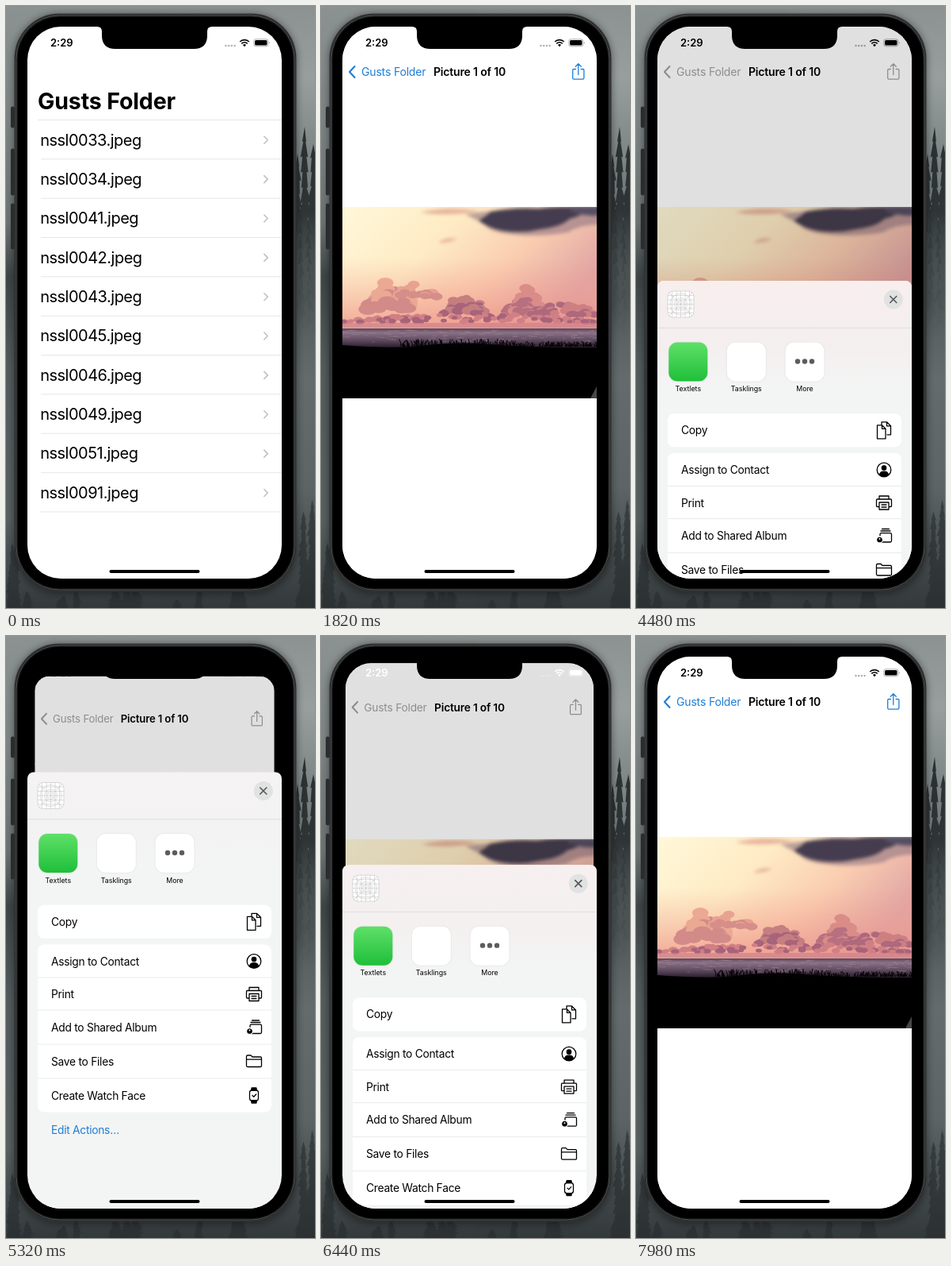
An HTML page for the animation above (8 s loop, 390 by 758 pixels).

```html
<!DOCTYPE html>
<html lang="en">
<head>
<meta charset="utf-8">
<title>Picture list</title>
<style>
  html, body { margin: 0; width: 100%; height: 100%; overflow: hidden; background: #4a5254; }
  svg { display: block; width: 390px; height: 758px; }
  text { font-family: Inter, "Liberation Sans", sans-serif; }
  .large { font-size: 28.5px; font-weight: 700; letter-spacing: -.005em; }
  .row { font-size: 20px; letter-spacing: -.025em; }
  .bar { font-size: 14px; letter-spacing: -.012em; }
  .bold { font-weight: 600; }
  .item { font-size: 13.8px; letter-spacing: -.02em; }
  .label { font-size: 8.8px; text-anchor: middle; }
  .line { fill: none; stroke: currentColor; stroke-linecap: round; stroke-linejoin: round; }
</style>
</head>
<body>
<svg viewBox="0 0 390 758">
  <defs>
    <linearGradient id="mistL" x2="0" y2="1">
      <stop offset="0" stop-color="#8b9291"/><stop offset=".18" stop-color="#7e8685"/>
      <stop offset=".36" stop-color="#6b7373"/><stop offset=".45" stop-color="#3f4647"/>
      <stop offset=".6" stop-color="#545c5d"/><stop offset=".85" stop-color="#596162"/>
      <stop offset="1" stop-color="#33393b"/>
    </linearGradient>
    <linearGradient id="mistR" x2="0" y2="1">
      <stop offset="0" stop-color="#8b9291"/><stop offset=".12" stop-color="#979e9d"/>
      <stop offset=".3" stop-color="#737b7b"/><stop offset=".48" stop-color="#515959"/>
      <stop offset=".62" stop-color="#636b6c"/><stop offset=".8" stop-color="#5c6465"/>
      <stop offset="1" stop-color="#33393b"/>
    </linearGradient>
    <linearGradient id="pine" gradientUnits="userSpaceOnUse" x1="0" x2="0" y1="150" y2="420">
      <stop offset="0" stop-color="#2a2f30"/><stop offset=".4" stop-color="#2f3536"/>
      <stop offset="1" stop-color="#495152" stop-opacity="0"/>
    </linearGradient>
    <linearGradient id="sky" x2="1" y2=".5">
      <stop offset="0" stop-color="#fff8da"/><stop offset=".4" stop-color="#feebc4"/>
      <stop offset=".7" stop-color="#facdb0"/><stop offset="1" stop-color="#e0a4a4"/>
    </linearGradient>
    <linearGradient id="haze" x2="0" y2="1">
      <stop offset=".4" stop-color="#f4a592" stop-opacity="0"/>
      <stop offset="1" stop-color="#ec8f86" stop-opacity=".8"/>
    </linearGradient>
    <linearGradient id="sea" x2="0" y2="1">
      <stop offset="0" stop-color="#57435a"/><stop offset=".2" stop-color="#8b7286"/>
      <stop offset=".6" stop-color="#5b475c"/><stop offset="1" stop-color="#1c141f"/>
    </linearGradient>
    <linearGradient id="tint" x2="0" y2="1">
      <stop offset="0" stop-color="#f8eeee"/><stop offset=".5" stop-color="#f4efef"/>
      <stop offset="1" stop-color="#f2f5f4" stop-opacity="0"/>
    </linearGradient>
    <linearGradient id="green" x2="0" y2="1">
      <stop offset="0" stop-color="#5fe068"/><stop offset="1" stop-color="#1fbf3a"/>
    </linearGradient>
    <filter id="soft"><feGaussianBlur stdDeviation=".7"/></filter>
    <filter id="smoke"><feGaussianBlur stdDeviation="2.2"/></filter>
    <filter id="shade" x="-20%" y="-20%" width="140%" height="140%"><feGaussianBlur stdDeviation="4"/></filter>
    <clipPath id="screen"><rect x="27" y="26" width="321" height="695" rx="42"/></clipPath>
    <clipPath id="cardClip"><rect id="cardRect" x="27" y="26" width="321" height="760"/></clipPath>
    <clipPath id="photoClip"><rect x="27" y="253" width="321" height="241"/></clipPath>
  </defs>

  <rect width="195" height="758" fill="url(#mistL)"/>
  <rect x="195" width="195" height="758" fill="url(#mistR)"/>
  <g id="pines" fill="url(#pine)"/>
  <g id="woods" fill="#272c2e" opacity=".6" filter="url(#soft)"/>

  <rect x="9" y="9" width="359" height="732" rx="58" opacity=".35" filter="url(#shade)"/>
  <path d="M8.5 129v22M8.5 182v54M8.5 251v53" stroke="#2a2c2d" stroke-width="5" stroke-linecap="round"/>
  <path d="M366.5 198v86" stroke="#2a2c2d" stroke-width="3"/>
  <rect x="11.5" y="10.5" width="354" height="726" rx="56" fill="#111" stroke="#303233" stroke-width="2"/>
  <rect x="13" y="12" width="351" height="723" rx="54.5" fill="none" stroke="#5b5d5e" stroke-width=".9"/>
  <rect x="15" y="14" width="347" height="719" rx="53"/>

  <g clip-path="url(#screen)">
    <g id="card"><g clip-path="url(#cardClip)">
      <rect x="27" y="26" width="321" height="760" fill="#fff"/>
      <g id="list"></g>
      <g id="detail">
        <rect x="27" y="26" width="321" height="760" fill="#fff"/>
        <g clip-path="url(#photoClip)">
          <rect x="27" y="253" width="321" height="160" fill="url(#sky)"/>
          <rect x="27" y="253" width="321" height="160" fill="url(#haze)"/>
          <g id="storm" filter="url(#smoke)"></g>
          <g id="clouds" filter="url(#soft)"></g>
          <rect x="27" y="406" width="321" height="26" fill="url(#sea)"/>
          <path id="waves" stroke="#b0909c" stroke-width=".6" opacity=".6"/>
          <path d="M27 427Q80 431 115 429Q170 422 215 426T348 430V494H27Z"/>
          <path id="grass" fill="none" stroke="#060406" stroke-width="1"/>
          <path d="M348 479v15h-8z" fill="#4a4648"/>
        </g>
      </g>
      <text id="large" class="large">Gusts Folder</text>
      <g id="nav">
        <g id="back">
          <path class="line" d="M42.500 76l-6.500 7 6.500 7" stroke-width="2.100"/>
          <text class="bar" x="51" y="88" fill="currentColor">Gusts Folder</text>
        </g>
        <text id="title" class="bar bold" y="88">Picture 1 of 10</text>
        <path id="share" class="line" stroke-width="1.3" d="M321.500 79.500h-2.500q-1.300 0-1.300 1.300v10q0 1.300 1.300 1.300h11.600q1.300 0 1.300-1.300v-10q0-1.300-1.300-1.300h-2.500M324.800 86.500v-13.500M321.300 76.300l3.500-3.500 3.500 3.500"/>
      </g>
      <rect id="dim" x="27" y="26" width="321" height="760"/>
    </g></g>

    <g id="status" fill="currentColor">
      <text x="56" y="51" font-size="13" class="bold">2:29</text>
      <g opacity=".3">
        <circle cx="277.500" cy="50" r="1.300"/><circle cx="281.200" cy="50" r="1.300"/>
        <circle cx="284.900" cy="50" r="1.300"/><circle cx="288.600" cy="50" r="1.300"/>
      </g>
      <path d="M295.200 45a8.400 8.400 0 0 1 11.600 0M297.300 47.300a5.400 5.400 0 0 1 7.400 0" fill="none" stroke="currentColor" stroke-width="1.700"/>
      <path d="M299 49a2.800 2.800 0 0 1 4 0L301 51.200z"/>
      <rect x="312.800" y="41.800" width="18" height="9" rx="2.600" fill="none" stroke="currentColor" stroke-width=".8" opacity=".4"/>
      <rect x="314.100" y="43.100" width="15.400" height="6.400" rx="1.500"/>
      <path d="M332 44.800q1.500 1.500 0 3z" opacity=".5"/>
    </g>

    <g id="sheet"></g>
    <rect x="130.500" y="710" width="114" height="4" rx="2"/>
  </g>
  <path d="M115 25H260V26Q254 26 254 32V37Q254 54 237 54H138Q121 54 121 37V32Q121 26 115 26Z"/>
</svg>
<script>
const $ = id => document.getElementById(id);
const range = n => [...Array(n).keys()];
let seed = 11;
const rnd = () => (seed = seed * 16807 % 2147483647) / 2147483647;
const mix = (a, b, k) => a + (b - a) * k;
const clamp = v => Math.max(0, Math.min(1, v));

// Scenery
function tree(x, top, h, w) {
  const side = s => range(14).map(i => {
    const y = top + h * (i + 1) / 14, r = w / 2 * Math.sqrt((i + 1) / 14) * (.6 + rnd() * .7);
    return [[x + s * r, y], [x + s * r * .55, y - 1]];
  }).flat();
  return `<polygon points="${[[x, top], ...side(1), ...side(-1).reverse()].join(" ")}"/>`;
}
$("pines").innerHTML = tree(377, 152, 270, 24) + tree(388, 174, 250, 24) + tree(368, 186, 240, 20);
$("woods").innerHTML =
  range(7).map(() => tree(366 + rnd() * 26, 620 + rnd() * 90, 160, 20)).join("") +
  range(5).map(() => tree(rnd() * 14, 670 + rnd() * 50, 110, 16)).join("") +
  range(18).map(() => tree(rnd() * 390, 725 + rnd() * 24, 60, 16 + rnd() * 20)).join("");

// A heap of small blobs on a flat base, lit from above
function puff(x, y, w, h, light, dark, n) {
  return range(n).map(i => {
    const u = rnd() * 2 - 1, r = 1.5 + h * (.06 + rnd() * .1);
    const top = h * (1 - u * u) * (1 - i / n);
    return `<ellipse cx="${x + u * w / 2}" cy="${y - top * (.7 + rnd() * .3)}" rx="${r * 1.6}" ry="${r}" fill="${rnd() < 1.1 - i / n ? light : dark}"/>`;
  }).join("");
}
$("storm").innerHTML =
  `<path d="M182 262q40-6 90-5q40-6 80-4v22q-25 0-40 10q-40 7-75 2q-25-3-30-12q-12-6-25-13z" fill="#8f7480" opacity=".6"/>
   <path d="M199 270q10-6 15-11q30-6 60-4q30-4 62-1q-4 10-22 14q-10 10-35 13q-25 6-50 2q-20-4-30-13z" fill="#443e50"/>
   <path d="M315 252h40v11q-18 4-40-5z" fill="#575064"/>
   <path d="M125 260q35-9 75-2q-40 8-75 2zM148 298q10-8 24-5q-10 6-24 5z" fill="#e8b69e"/>`;
$("clouds").innerHTML =
  puff(88, 382, 60, 38, "#eba994", "#d28b88", 60) + puff(120, 366, 52, 20, "#e8a290", "#d58e89", 34) +
  puff(182, 387, 54, 24, "#c57f80", "#a7647a", 50) + puff(258, 386, 44, 32, "#d98c88", "#b87080", 50) +
  puff(304, 389, 84, 20, "#cd7f82", "#ad697d", 50) + puff(188, 398, 350, 12, "#d08084", "#a8637b", 130) +
  `<rect x="20" y="399" width="340" height="6" fill="#cf828a" opacity=".7"/>`;
$("waves").setAttribute("d", range(110).map(() =>
  `M${27 + rnd() * 318} ${408 + rnd() * 15}h${2 + rnd() * 8}`).join(""));
$("grass").setAttribute("d", range(230).map(() => {
  const x = 100 + rnd() * 248, h = 2 + rnd() * (x < 245 ? 8 : 5);
  return `M${x} 429q${rnd() * 4 - 2} ${-h / 2} ${rnd() * 6 - 3} ${-h}`;
}).join(""));

// File list
const files = ["0033", "0034", "0041", "0042", "0043", "0045", "0046", "0049", "0051", "0091"];
$("list").innerHTML = `<rect id="press" x="27" y="143.500" width="321" height="49.300" fill="#d1d1d6"/>
  <path d="M40 143.500H348" stroke="#e0e0e2" stroke-width=".8"/>` +
  files.map((n, i) => `<g transform="translate(0 ${i * 49.35})">
    <text class="row" x="43.200" y="175.700">nssl${n}.jpeg</text>
    <path class="line" d="M325.800 164.300l4.500 4.500-4.500 4.500" style="color:#bfbfc3" stroke-width="1.500"/>
    <path d="M44 192.800H348" stroke="#e0e0e2" stroke-width=".8"/></g>`).join("");

// Share sheet, laid out from its own top edge
const icons = {
  copy: `<path d="M-3-7.500v-3h6.500l5 5v11h-4.500M3.500-10.500v5h5M-8.500-6.500h6l4.500 4.500v12.500h-10.500zM-2.500-6.500v4.500h4.500"/>`,
  person: `<circle r="8.800"/><path d="M-5.500 6a5.600 4.800 0 0 1 11 0a8 8 0 0 1-11 0z" fill="#000"/><circle cy="-2.500" r="2.700" fill="#000"/>`,
  print: `<path d="M-6-4.500v-4h12v4M-6 5h-2.500q-1 0-1-1v-7.500q0-1 1-1h17q1 0 1 1v7.500q0 1-1 1h-2.500M-6-.5h12v9h-12zM-3 2.500h6M-3 5.500h6"/>`,
  album: `<path d="M-2.500-8.500h9M-4-6h12"/><rect x="-5" y="-3.300" width="14.500" height="11.300" rx="1.500"/><circle cx="-5.500" cy="5" r="4" fill="#000" stroke="#fff"/><circle cx="-5.500" cy="4" r="1" fill="#fff" stroke="none"/>`,
  folder: `<path d="M-9.500-6q0-1.500 1.500-1.500h4l2 2h10q1.500 0 1.500 1.500v9.500q0 1.500-1.500 1.500h-16q-1.500 0-1.500-1.500zM-9.500-2.300h19"/>`,
  watch: `<path d="M-3.500-6.500l.7-3h5.600l.7 3zM-3.500 6.500l.7 3h5.600l.7-3z" fill="#000"/><rect x="-5.500" y="-6.500" width="11" height="13" rx="3"/><path d="M-2 0l1.700 1.700 3-3.200"/>`
};
const item = (name, icon, y) => `<text class="item" x="57" y="${y + 5}">${name}</text>
  <g class="line" stroke-width="1.300" transform="translate(313 ${y})">${icons[icon]}</g>`;
const app = (x, name, fill) => `<rect x="${x - 25.500}" y="76.500" width="51" height="51" rx="12" fill="#000" opacity=".045"/>
  <rect x="${x - 24.500}" y="77.500" width="49" height="49" rx="11" fill="${fill}"/>
  <text class="label" x="${x}" y="139">${name}</text>`;
const grid = range(5).map(i => `M${45.500 + i * 5.500} 13v33M40 ${18.500 + i * 5.500}h33`).join("");

$("sheet").innerHTML = `
  <rect x="27" width="321" height="760" rx="8" fill="#f3f5f5"/>
  <rect id="glow" x="27" width="321" height="170" rx="8" fill="url(#tint)"/>
  <rect x="40" y="13" width="33" height="33" rx="7" fill="#fff" stroke="#c9c9c9" stroke-width=".7"/>
  <g fill="none" stroke="#c6c6c6" stroke-width=".6">
    <path d="${grid}M41.500 14.500l30 30M71.500 14.500l-30 30"/>
    <circle cx="56.500" cy="29.500" r="13.500"/><circle cx="56.500" cy="29.500" r="8"/><circle cx="56.500" cy="29.500" r="4.500"/>
  </g>
  <circle cx="324.800" cy="23.500" r="12" fill="#e1e2e2"/>
  <path class="line" d="M320.800 19.500l8 8M328.800 19.500l-8 8" style="color:#58595b" stroke-width="1.700"/>
  <path d="M27 59.300H348" stroke="#d9dada" stroke-width=".8"/>
  ${app(65.800, "Textlets", "url(#green)")}${app(139.300, "Tasklings", "#fff")}${app(213, "More", "#fff")}
  <g fill="#5b5c5e"><circle cx="204" cy="101.500" r="3.200"/><circle cx="213" cy="101.500" r="3.200"/><circle cx="222" cy="101.500" r="3.200"/></g>
  <rect x="40" y="167.300" width="295" height="42" rx="8" fill="#fff"/>
  <rect x="40" y="217" width="295" height="211" rx="8" fill="#fff"/>
  <path d="M40 258.500h295M40 299.500h295M40 342.500h295M40 385.500h295" stroke="#e4e5e5" stroke-width=".8"/>
  ${item("Copy", "copy", 188.300)}${item("Assign to Contact", "person", 238)}${item("Print", "print", 279.500)}
  ${item("Add to Shared Album", "album", 321)}${item("Save to Files", "folder", 364)}${item("Create Watch Face", "watch", 407)}
  <text class="item" x="57" y="455" fill="#1e7dd6">Edit Actions…</text>`;

// Critically damped spring from 0 to 1, settled at the end time
function spring(t, start, end, rate) {
  if (t <= start) return 0;
  if (t >= end) return 1;
  const x = (t - start) / 1000 * rate;
  return 1 - (1 + x) * Math.exp(-x);
}
const move = (id, x, y, s = 1) => $(id).setAttribute("transform", `translate(${x} ${y}) scale(${s})`);
const fade = (id, v) => $(id).setAttribute("opacity", v);

function draw(time) {
  const t = Math.floor(time / 70) * 70;
  const push = spring(t, 1330, 1820, 18);
  const shown = spring(t, 3850, 4480, 13) - spring(t, 7280, 7980, 13);
  const grow = spring(t, 5110, 5880, 10.4) - spring(t, 6160, 7000, 10.4);

  fade("press", t >= 1260 && t < 1820 ? 1 : 0);
  move("list", -96 * push, 0);
  move("detail", 321 * (1 - push), 0);
  move("large", mix(40, 51, push), mix(130, 88, push), mix(1, .5, push));
  fade("large", clamp(1 - push * 1.4));
  fade("nav", push);
  move("back", 70 * (1 - push), 0);
  $("title").setAttribute("x", mix(300, 142, push));

  const gray = clamp(shown * 1.5);
  $("nav").style.color = `rgb(${mix(30, 160, gray)},${mix(125, 160, gray)},${mix(214, 160, gray)})`;
  fade("share", t < 3850 ? 1 : clamp(.22 + (t - 3850) / 400));
  fade("dim", .12 * shown);

  const scale = 1 - .084 * Math.pow(grow, .8);
  move("card", 187.5 * (1 - scale), 26 * (1 - scale) + 38.4 * grow, scale);
  $("cardRect").setAttribute("rx", grow > 0 ? mix(40, 9, grow) : 0);
  move("sheet", 0, 721 - 375 * shown - 272 * grow);
  fade("glow", 1 - grow);

  const white = 255 * (clamp((t - 5350) / 420) - clamp((t - 6440) / 400));
  $("status").style.color = `rgb(${white},${white},${white})`;
}

const begin = performance.now();
function tick() {
  draw((performance.now() - begin) % 8000);
  requestAnimationFrame(tick);
}
tick();
</script>
</body>
</html>
```
